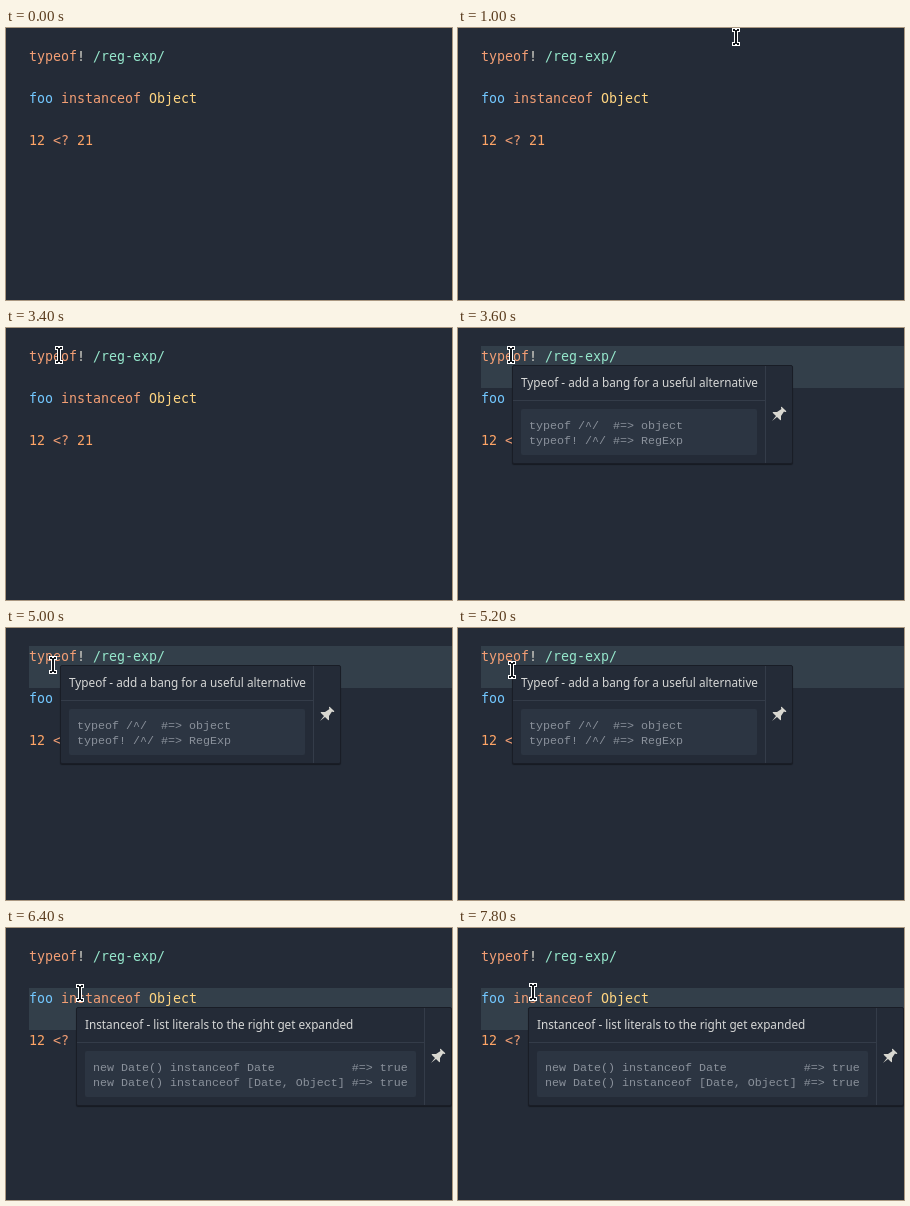
Write an HTML page that moves like this. It is 446 px wide and 272 px high and loops after 8000 ms.

```html
<!DOCTYPE html>
<html lang="en">
<head>
<meta charset="utf-8">
<title>Operator hints</title>
<style>
  html, body { margin: 0; width: 100%; height: 100%; overflow: hidden; background: #242b37; }
  div, svg { position: absolute; box-sizing: border-box; white-space: pre; }
  #stage { left: 0; top: 0; width: 446px; height: 272px; overflow: hidden; }
  #lines { left: 23px; top: 18px; font: 13.3px/21px "DejaVu Sans Mono", monospace; }
  .op { color: #f29e74; }
  .num { color: #ffa566; }
  .regex { color: #95e6cb; }
  .name { color: #73c8ff; }
  .type { color: #ffd580; }
  .plain { color: #d9d7ce; }
  .hint { visibility: hidden; }
  .band { left: 23px; right: 0; height: 42px; background: #333f4a; }
  .box { height: 99px; background: #242b37; border: 1px solid #191d26; border-radius: 2px; box-shadow: 0 1px 1px #0006; }
  .title { left: 8px; top: 6px; font: 11.75px/20px "Noto Sans", sans-serif; color: #d6d7d6; }
  .rule { left: 0; right: 27px; top: 34px; height: 1px; background: #343c49; }
  .side { right: 26px; top: 0; bottom: 0; width: 1px; background: #343c49; }
  .block { left: 8px; right: 35px; top: 43px; height: 46px; border-radius: 2px; background: #2c3542; }
  .row { left: 8px; font: 11.67px/14px "Liberation Mono", monospace; color: #8a919b; }
  .pin { right: 5px; top: 40px; width: 16px; height: 16px; fill: #d9d8d1; }
  #cursor { left: 0; top: 0; width: 8px; height: 18px; }
</style>
</head>
<body>
<div id="stage">
  <div id="bands"></div>
  <div id="lines"><span class="op">typeof</span><span class="plain">! </span><span class="regex">/reg-exp/</span>

<span class="name">foo </span><span class="op">instanceof </span><span class="type">Object</span>

<span class="num">12 </span><span class="op">&lt;? </span><span class="num">21</span></div>
  <svg id="cursor" viewBox="-4 0 8 18">
    <path d="M-4 0H4V4H2V14H4V18H-4V14H-2V4H-4Z" fill="#fff"/>
    <path d="M-3 1H-1V2H1V1H3V3H1V15H3V17H1V16H-1V17H-3V15H-1V3H-3Z" fill="#11151b"/>
  </svg>
</div>
<script>
const LOOP = 8000, STEP = 200;
const stage = document.getElementById("stage");
const cursor = document.getElementById("cursor");

// Each hint: shown from/to, box corner, width, title and code rows
const hints = [
  { from: 3600, to: 5400, x: 54, y: 37, w: 281,
    title: "Typeof - add a bang for a useful alternative",
    code: ["typeof /^/  #=> object", "typeof! /^/ #=> RegExp"] },
  { from: 6400, to: LOOP, x: 70, y: 79, w: 376,
    title: "Instanceof - list literals to the right get expanded",
    code: ["new Date() instanceof Date".padEnd(37) + "#=> true",
           "new Date() instanceof [Date, Object] #=> true"] }
];

// Cursor legs: start, end, then the x and y reached; it rests in between
const entry = { x: 417, y: 0 };
const legs = [
  [200, 1200, 243, 0],
  [1200, 2400, 75, 0],
  [2400, 3400, 53, 18],
  [4200, 4400, 53, 17],
  [4600, 5000, 47, 28],
  [5000, 6200, 74, 56],
  [7600, 7800, 75, 55]
];

function add(parent, name, text = "") {
  const el = document.createElement("div");
  el.className = name;
  el.textContent = text;
  return parent.appendChild(el);
}

function buildHint({ x, y, w, title, code }) {
  const band = add(stage, "hint band");
  band.style.top = y - 19 + "px";
  stage.prepend(band);
  const box = add(stage, "hint box");
  box.style.cssText = `left: ${x}px; top: ${y}px; width: ${w}px`;
  add(box, "title", title);
  add(box, "rule");
  add(box, "side");
  const block = add(box, "block");
  code.forEach((row, i) => add(block, "row", row).style.top = 10 + 15 * i + "px");
  box.insertAdjacentHTML("beforeend", `<svg class="pin" viewBox="0 0 16 16">
    <path d="M10 1.2V2L10.5 3L6 6H2.2C1.8 6 1.5 6.5 1.9 6.9L5 10L1 15L6 11L9.1 14.1
             C9.5 14.5 10 14.2 10 13.8V10L13 5.5L14 6H14.8C15.2 6 15.5 5.5 15.1 5.1L10.9 .9C10.5 .5 10 .8 10 1.2Z"/></svg>`);
  return [band, box];
}

const parts = hints.map(buildHint);
stage.append(cursor);

function cursorAt(t) {
  let { x, y } = entry;
  for (const [start, end, toX, toY] of legs) {
    const p = Math.min(1, Math.max(0, (t - start) / (end - start)));
    // Aiming downwards slows to a stop
    const ease = toY ? 1 - (1 - p) ** 1.6 : p;
    x += (toX - x) * ease;
    y += (toY - y) * p;
  }
  return [Math.round(x), Math.round(y)];
}

const show = (el, on) => el.style.visibility = on ? "visible" : "hidden";

function draw(now) {
  const t = Math.floor(now % LOOP / STEP) * STEP;
  const [x, y] = cursorAt(t);
  cursor.style.transform = `translate(${x - 4}px, ${y}px)`;
  show(cursor, t >= legs[0][0]);
  hints.forEach(({ from, to }, i) => {
    for (const el of parts[i]) show(el, t >= from && t < to);
  });
}

const start = performance.now();
function tick() {
  draw(performance.now() - start);
  requestAnimationFrame(tick);
}
tick();
</script>
</body>
</html>
```
